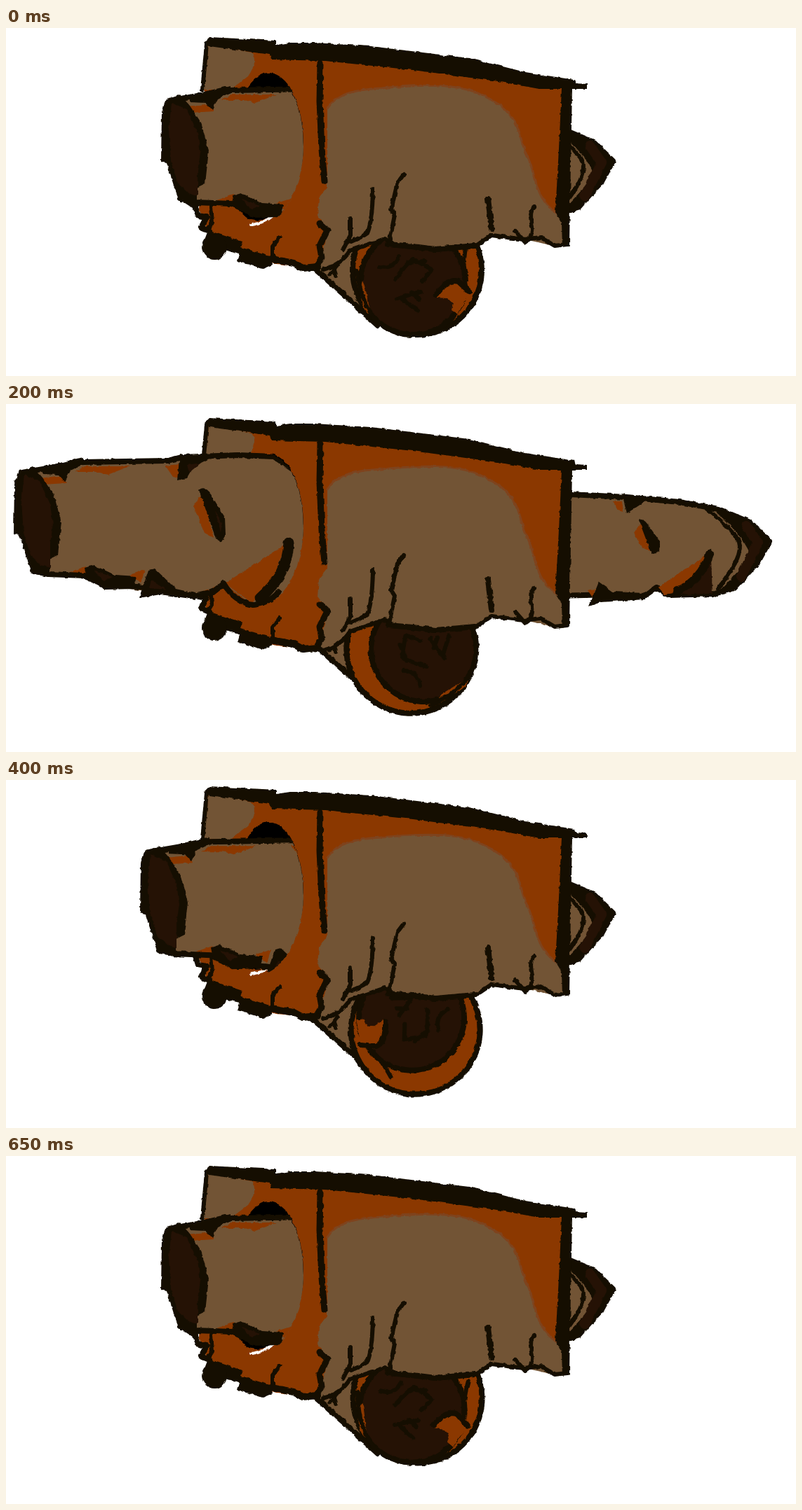
Write an HTML page that moves like this. It is 1126 by 497 pixels and loops after 700 ms.

```html
<!DOCTYPE html>
<html lang="en">
<head>
<meta charset="utf-8">
<title>Cannon</title>
<style>
  html, body { margin: 0; height: 100%; overflow: hidden; background: #fff; }
  svg { display: block; width: 1126px; height: 497px; }
  path, circle { stroke-linejoin: round; stroke-linecap: round; }
  .ink { fill: #150e01; }
  .tan { fill: #725435; }
  .rust { fill: #8b3800; }
  .dark { fill: #251205; }
  .line { fill: none; stroke: #150e01; stroke-width: 8; }
  .thin { stroke-width: 6; }
  .edge { stroke: #150e01; stroke-width: 8; }
</style>
</head>
<body>
<svg viewBox="0 0 1126 497">
  <defs>
    <filter id="rough" filterUnits="userSpaceOnUse" x="0" y="0" width="1126" height="497" color-interpolation-filters="sRGB">
      <feTurbulence type="fractalNoise" baseFrequency=".14" numOctaves="2" seed="4"/>
      <!-- opaque noise keeps the displacement centred -->
      <feColorMatrix values="1 0 0 0 0  0 1 0 0 0  0 0 1 0 0  0 0 0 0 1" result="noise"/>
      <feDisplacementMap in="SourceGraphic" in2="noise" scale="4" xChannelSelector="R" yChannelSelector="G"/>
    </filter>
    <clipPath id="opening">
      <path id="mouth" d="M-300-50H370V71C405,73 424,120 424,176C424,225 400,291 350,292V500H-300Z"/>
    </clipPath>
  </defs>

  <g filter="url(#rough)">
    <g id="nose">
      <path class="tan edge" d="M560,122L662,127 737,134 792,144 837,163 865,190 849,219 815,257 787,265 722,267 704,256 687,268 642,266 560,268Z"/>
      <path class="ink" d="M655,122L690,132 662,150ZM608,283L622,248 644,264 690,267 688,273 625,277Z"/>
      <path class="rust" d="M642,133L655,133 657,148 649,146ZM672,178L682,163 695,204 683,199ZM606,260L617,258 613,270ZM706,256L776,209 742,262 715,266Z"/>
      <path class="dark" d="M782,214L784,265 735,266Z"/>
      <path class="ink" d="M679,160Q686,155 696,172L709,190 708,205 697,208Z"/>
      <path class="line" d="M780,208Q768,245 733,262" style="stroke-width:12"/>
      <path class="ink" d="M775,139L837,159 869,190 848,226 812,262 785,269Q838,218 837,207Q826,180 785,145Z"/>
      <path d="M832,168L849,192 825,240" fill="none" stroke="#251205" stroke-width="14"/>
      <path class="line thin" d="M776,144Q806,168 820,187Q830,203 806,238L792,258"/>
    </g>

    <path class="tan" d="M430,335L525,290 525,420Z"/>
    <path class="line" d="M430,335L482,381 530,425"/>
    <path class="line thin" d="M462,352L472,338M468,345L470,354"/>

    <g id="wheel">
      <circle class="rust edge" cx="3" cy="-5" r="92"/>
      <circle class="dark edge" cx="-3" cy="12" r="75"/>
      <g transform="translate(2 6)">
        <path class="rust" d="M-77,4C-84,26 -76,54 -61,54C-71,38 -69,20 -77,4Z"/>
        <path class="line thin" d="M-85,-10Q-78,42 -52,66"/>
        <path class="rust" d="M28,28L50,5 73,5 75,21 59,52 50,46 52,36 44,29Z"/>
        <path class="line" d="M28,24Q45,0 60,5L76,20"/>
        <path class="line thin" d="M-53,-16Q-32,-12 -25,-31M-30,2Q-15,-20 -5,-27L22,-12 8,5M-12,-22L12,-24M-27,30L-10,24 6,20M-22,29L1,46M-8,20L4,30M70,-43Q65,-10 70,10"/>
      </g>
    </g>

    <g id="body">
      <path class="rust" d="M286,30L450,48 800,92 794,300 500,310 440,350 385,345 332,328 290,305 275,265Z"/>
      <path class="tan" d="M289,31L350,42Q360,54 345,76L320,95 282,95Z"/>
      <path class="tan" d="M458,122C470,102 495,95 535,93C630,84 665,90 705,118C736,143 730,165 743,190C758,222 752,252 795,278L802,318 780,318 740,309 690,303 670,318 610,325 550,315 540,308 490,325 455,352 448,340 460,295 444,275 446,250 458,235Z"/>
      <path d="M458,122C470,102 495,95 535,93C630,84 665,90 705,118C736,143 730,165 743,190C758,222 752,252 790,275" fill="none" stroke="#7f431d" stroke-width="3"/>
      <path class="line" d="M448,57L447,112 450,180 454,226" style="stroke-width:9"/>
      <path class="line" d="M447,286L458,296 447,318 450,335 441,350" style="stroke-width:9"/>
      <path class="line thin" d="M452,352Q478,345 490,325L540,308 552,317 612,324 670,318 692,303 738,309 762,306 782,318 800,316"/>
      <path class="line" d="M545,316L580,319 612,323 668,318"/>
      <path class="ink" d="M792,94L807,94 805,200 803,316 793,320 792,285 783,270 788,180Z"/>
      <path class="line thin" d="M491,279L491,303 480,324M523,237Q522,285 515,300Q505,307 492,312M567,216L558,228 549,266 554,274 546,314M753,263Q745,269 750,290Q752,306 740,313L726,297"/>
      <path class="line" d="M687,251L692,294"/>
      <path class="line thin" d="M286,30L280,95M390,306L380,319 380,337M292,262L294,285 288,295"/>
      <path class="line" d="M250,249L270,262 274,275 286,277 278,292 290,297"/>
      <path class="ink" d="M288,296L337,312 334,320 376,333 380,345 366,351 330,340 333,329 312,324 282,312Z"/>
      <circle class="ink" cx="297" cy="320" r="18"/>
      <path class="line" d="M378,337L410,343 423,350 444,348" style="stroke-width:10"/>
      <path class="ink" d="M282,28L290,20 385,25 385,31 405,28 440,28 520,33 660,50 740,70 810,81 812,86 828,87 828,94 760,94 700,83 580,67 455,54 378,52 376,45 290,33Z"/>
      <path d="M322,180C325,110 350,71 375,71C405,73 424,120 424,176C424,225 395,282 355,282C335,280 322,262 322,180Z"/>
      <path d="M350,288Q368,286 382,274" fill="none" stroke="#fff" stroke-width="4"/>
    </g>

    <g clip-path="url(#opening)">
      <g id="barrel">
        <path class="tan" d="M232,103L320,88 460,84 540,80 660,84V270L560,292 520,262 480,279 400,272 360,266 320,251 265,248Z"/>
        <path class="rust" d="M258,112L292,108 296,119 262,121ZM308,103L322,95 386,95 355,107 340,103ZM437,94L457,92 460,113 448,110ZM477,152L490,133 506,197 493,190ZM300,246L324,238 326,250ZM386,250L408,243 402,262ZM522,262L608,207 590,260 560,290Z"/>
        <path class="line" d="M232,104L320,89 440,87 460,82 540,79 592,81 620,100"/>
        <path class="ink" d="M262,96L320,82 320,92 302,101 294,117 285,107 262,106ZM458,77L500,84 478,95 468,112 454,115ZM485,129Q491,121 502,135L522,168 523,193 517,203 509,198Z"/>
        <path class="dark" d="M468,93L488,90 471,104ZM508,158L518,176 516,190Z"/>
        <path class="line" d="M248,244L270,249 322,251 350,264 400,267 440,273 482,280 505,275 520,263"/>
        <path class="ink" d="M322,240L335,236 365,250 396,252 392,270 352,271 325,255ZM400,283L413,243 422,241 452,270 478,276 480,285 430,278Z"/>
        <path class="dark" d="M335,244L362,253 350,259ZM417,258L438,271 414,269Z"/>
        <path class="line" d="M520,262Q535,288 562,293Q585,290 598,275"/>
        <path class="line" d="M613,204Q611,250 572,283" style="stroke-width:15"/>
        <path class="ink" d="M227,104L248,95 262,111 278,135 289,175 284,222 272,228 272,250 248,249 240,228 229,193 221,191 222,120Z"/>
        <path class="dark" d="M236,107L258,116 273,150 277,178 273,205 273,240 260,236 245,222 235,190 232,145Z"/>
      </g>
    </g>
  </g>
</svg>
<script>
  const STEP = 50, STEPS = 14;
  const bounce = [-7, -3, 0, 4, 0, -7, -15, -19, -11, -4, 4, 8, 1, -6];
  const $ = id => document.getElementById(id);
  const move = (id, x, y, extra = '') =>
    $(id).setAttribute('transform', `translate(${x} ${y})${extra}`);

  // Fast push out, then a steady pull back to rest.
  const slide = (t, out, peak, back) =>
    Math.max(0, Math.min(out * t, peak - back * (t - 200)));

  function draw(now) {
    const step = Math.floor(now / STEP) % STEPS;
    const t = step * STEP;
    const barrel = slide(t, 1.44, 210, 0.9);
    const nose = slide(t, 1.68, 223, 1.67);
    move('barrel', -barrel, -barrel * 0.028);
    move('nose', nose, nose * 0.027);
    move('body', 0, bounce[step]);
    move('mouth', 0, bounce[step]);
    move('wheel', 583, 351, ` rotate(${-27.2 * step})`);
  }

  function loop(now) {
    draw(now);
    requestAnimationFrame(loop);
  }
  draw(0);
  requestAnimationFrame(loop);
</script>
</body>
</html>
```
